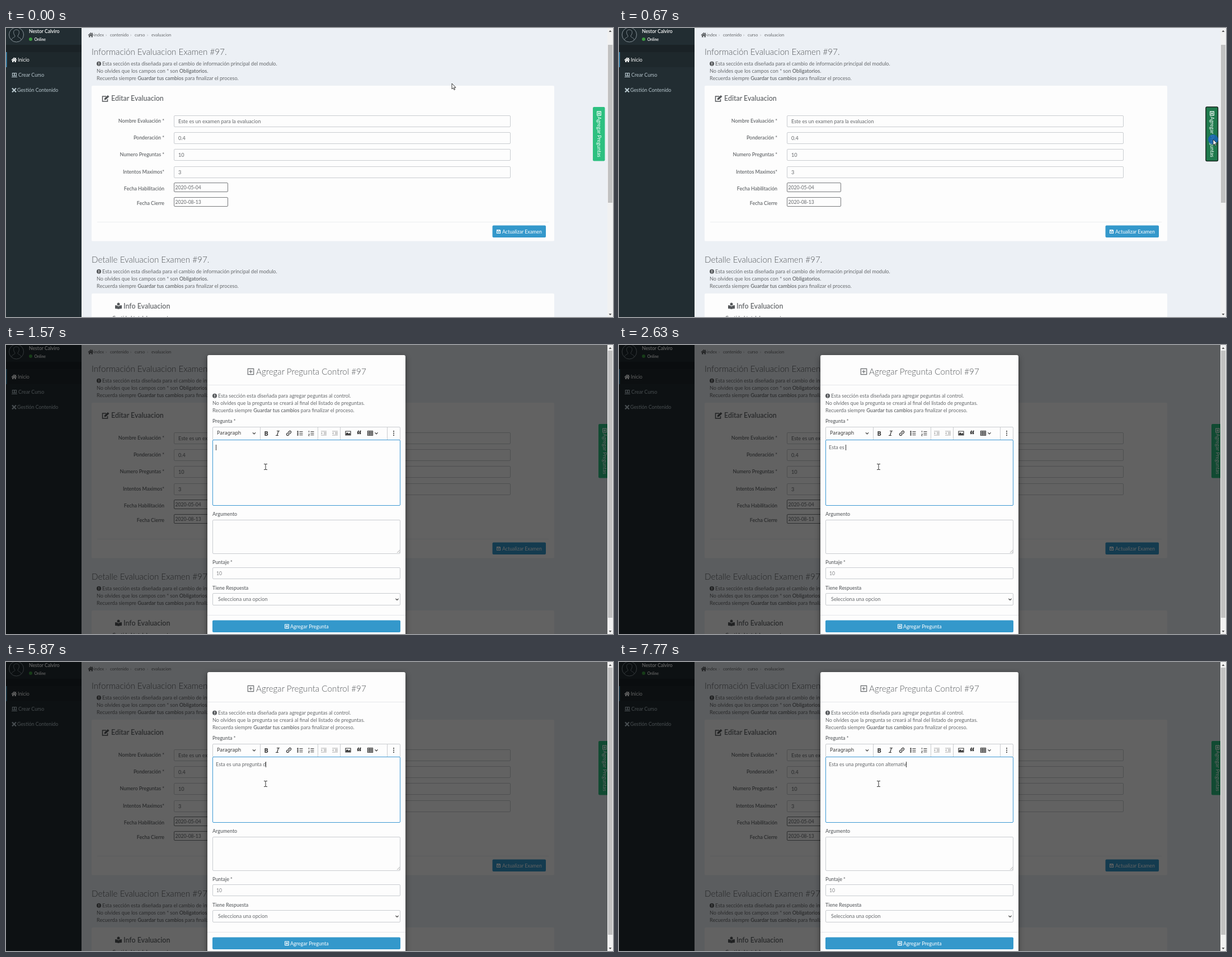
These frames come from a looping animation (1085x516 px, 8 s). An HTML page:

```html
<!DOCTYPE html>
<html lang="es">
<head>
<meta charset="utf-8">
<style>
  html, body { margin: 0; width: 100%; height: 100%; overflow: hidden; background: #ecf0f5; }
  svg { display: block; }
  text { font: 9.1px Lato, "Open Sans", sans-serif; fill: #66696c; white-space: pre; }
  .title { font-size: 15.2px; font-weight: 300; fill: #55585b; }
  .sub { font-size: 12.4px; font-weight: 600; }
  .label, .bold { font-weight: 600; }
  .label { font-size: 8.9px; }
  .crumb { font-size: 7.6px; }
  .menu { font-size: 8.9px; fill: #b8c7ce; }
  .white { fill: #fff; }
  .end { text-anchor: end; }
  .mid { text-anchor: middle; }
  .date { font-size: 8.6px; }
  .tool { font: 8.8px "Noto Sans", sans-serif; fill: #333; }
  .field { fill: #fdfdfd; stroke: #c9ccd0; }
  .line { fill: none; stroke: #333; stroke-width: 1.2; }
  .shadow { filter: drop-shadow(0 3px 5px rgba(0, 0, 0, .5)); }
</style>
</head>
<body>
<svg id="stage" width="1085" height="516" viewBox="0 0 1085 516"></svg>
<script>
const LOOP = 8000, PRESS = 630, OPEN = 700, FOCUS = 1470;

const text = (x, y, content, cls = '', extra = '') =>
  `<text x="${x}" y="${y}" class="${cls}" ${extra}>${content}</text>`;
const box = (x, y, w, h, fill, r = 0, extra = '') =>
  `<rect x="${x}" y="${y}" width="${w}" height="${h}" rx="${r}" fill="${fill}" ${extra}/>`;
const field = (x, y, w, h, extra = '') =>
  `<rect x="${x + .5}" y="${y + .5}" width="${w - 1}" height="${h - 1}" rx="1.5" class="field" ${extra}/>`;
const path = (d, extra = '') => `<path d="${d}" class="line" ${extra}/>`;
const shape = (d, fill, extra = '') => `<path d="${d}" fill="${fill}" ${extra}/>`;
const at = (x, y, content) => `<g transform="translate(${x} ${y})">${content}</g>`;

const home = (x, y, color) => at(x, y, shape('M-5 0L0-4.5 5 0 4 1 0-2.7-4 1ZM-3.4 1L0-2 3.4 1V4H1V1.5H-1V4H-3.4ZM2.3-4H3.5V-1L2.3-2Z', color));
const info = (x, y) => at(x, y, `<circle r="4" fill="#55585b"/>` + path('M0-2.5V.6M0 1.4V2.6', 'style="stroke:#fff"'));
const plus = (x, y, r, color) => at(x, y, path(`M${-r} ${-r}H${r}V${r}H${-r}ZM${-r * .6} 0H${r * .6}M0 ${-r * .6}V${r * .6}`, `style="stroke:${color}"`));
const save = (x, y) => at(x, y, path('M-3-3H2L3-2V3H-3ZM-1.5-3V-1H1.5V-3', 'style="stroke:#fff"') + '<circle cy="1" r="1" fill="#fff"/>');
const chevron = (x, y) => path(`M${x - 2.5} ${y - 1.2}l2.5 2.5 2.5-2.5`);

function notice(x, y, first, second) {
  return info(x + 4, y - 3.2) + text(x + 10, y, first) + text(x, y + 13, second) +
    text(x, y + 26, 'Recuerda siempre <tspan class="bold">Guardar tus cambios</tspan> para finalizar el proceso.');
}

function section(dy, name) {
  return at(0, dy, text(153, 48, `${name} Evaluacion Examen #97.`, 'title') +
    notice(162, 67, 'Esta sección esta diseñada para el cambio de información principal del modulo.',
      'No olvides que los campos con * son <tspan class="bold">Obligatorios</tspan>.') +
    box(153, 103, 827, 277.5, '#fdfdfd', 2));
}

function sidebar() {
  return box(0, 0, 135, 516, '#222d32') + box(0, 30, 135, 13, '#1a2226') +
    box(0, 43, 135, 27, '#1e282c') + box(0, 43, 1.5, 27, '#3c8dbc') +
    '<circle cx="18.5" cy="12" r="13" fill="#1c262b" stroke="#87939a"/>' +
    path('M10 21C11 16 16 18 16 14C12 9 13 3 18.5 3S25 9 21 14C21 18 26 16 27 21', 'style="stroke:#87939a;stroke-width:.9"') +
    text(41, 9, 'Nestor Calviro', 'white bold', 'style="font-size:8.6px"') +
    '<circle cx="44" cy="20" r="3" fill="#3c9a3f"/>' +
    text(50.5, 22.6, 'Online', 'white bold', 'style="font-size:7px"') +
    home(14.5, 57, '#fff') + text(21, 60, 'Inicio', 'menu white') +
    at(15, 84, path('M-3.5-3.5H3.5V1.5H-3.5ZM-5 3.5H5', 'style="stroke:#b8c7ce"') +
      '<circle cy="-1.5" r="1.2" fill="#b8c7ce"/>' + shape('M-2 1.5Q0-1.5 2 1.5', '#b8c7ce')) +
    text(22, 87, 'Crear Curso', 'menu') +
    path('M11 107.5l7 7M18 107.5l-7 7', 'style="stroke:#b8c7ce;stroke-width:2.2"') +
    text(20, 114, 'Gestión Contenido', 'menu');
}

function page() {
  const rows = [['Nombre Evaluación *', 'Este es un examen para la evaluacion'],
    ['Ponderación *', '0.4'], ['Numero Preguntas *', '10'], ['Intentos Maximos*', '3']];
  const dates = [['Fecha Habilitación', '2020-05-04'], ['Fecha Cierre', '2020-08-13']];
  const crumbs = [[157, 'index'], [186, 'contenido'], [230, 'curso'], [260, 'evaluacion']];
  const rowY = i => Math.round(156 + i * 30.2);
  return box(0, 0, 1085, 516, '#ecf0f5') + sidebar() + home(151.5, 12.5, '#55585b') +
    crumbs.map(([x, s]) => text(x, 15, s, 'crumb')).join('') +
    [178, 222, 252].map(x => text(x, 15, '›', 'crumb', 'opacity=".6"')).join('') +
    section(0, 'Información') + section(371, 'Detalle') +
    at(178, 126, path('M1-4H-5.5V5H3.5V1', 'style="stroke:#55585b;stroke-width:1.5"') +
      shape('M-2.5 2.5L-2-0.5 4-6 6.5-3.5 .5 2Z', '#55585b')) +
    text(188, 130, 'Editar Evaluacion', 'sub') +
    rows.map(([name, value], i) => text(283, rowY(i) + 13.3, name, 'label end') +
      field(300, rowY(i), 602, 21) + text(308, rowY(i) + 13.5, value)).join('') +
    dates.map(([name, value], i) => text(283, 290 + i * 26, name, 'label end') +
      field(300, 276 + i * 26, 97, 17, 'style="stroke:#77797c"') +
      text(302.5, 288 + i * 26, value, 'date')).join('') +
    box(163, 346, 807, 1, '#eceef0') +
    box(869.5, 352.5, 95.5, 21.5, '#3498cb', 2) + save(880.5, 363.5) +
    text(887, 366.5, 'Actualizar Examen', 'white', 'style="font-size:8.8px"') +
    at(201, 496, '<circle cy="-3" r="2.5" fill="#55585b"/>' + shape('M-6-1Q-2-1 0 1Q2-1 6-1V5Q2 5 0 6Q-2 5-6 5Z', '#55585b')) +
    text(210, 501, 'Info Evaluacion', 'sub') +
    text(190, 521, 'Cantidad total de preguntas:', 'label');
}

const sideButton = `<g id="sideButton"><rect id="sideFill" x="1049" y="141" width="21.5" height="96.5" rx="2"/>` +
  plus(1060, 152.5, 3.3, '#fff') + text(0, 0, 'Agregar Preguntas', 'white', 'transform="translate(1057 158) rotate(90)" style="font-size:9px"') + '</g>';

const scrollbar = (id, y, h) => `<g id="${id}">` + box(1075, 0, 10, 516, '#f1f1f1') +
  box(1076, y, 8, h, '#c1c1c1') + shape('M1077.5 7l2.5-3 2.5 3ZM1077.5 510l2.5 3 2.5-3Z', '#505050') + '</g>';

function toolbar() {
  const rows = [-3, 0, 3];
  const list = x => at(x, 157.5, path(rows.map(y => `M-1 ${y}H5`).join('')));
  const indent = (x, dir) => at(x, 157.5, path('M-5-3.5H5M0-1.2H5M0 1.2H5M-5 3.5H5', 'style="stroke:#aaa"') +
    shape(`M${-3.5 - dir}-2L${-3.5 + dir * 1.5} 0 ${-3.5 - dir} 2Z`, '#aaa'));
  return field(369, 146, 336, 24) + text(377, 160.3, 'Paragraph', 'tool') + chevron(443.5, 157.5) +
    [454, 557, 597, 681].map(x => box(x, 147, 1, 22, '#c9ccd0')).join('') +
    text(465.3, 161.5, 'B', 'tool mid', 'style="font-size:11px;font-weight:800"') +
    path('M484 153.5H489M482 161.5H487M487 153.5L484.5 161.5') +
    at(505.5, 157.5, '<g transform="rotate(-45)">' + path('M-.5-2H-3A2 2 0 0 0-3 2H-.5M.5-2H3A2 2 0 0 1 3 2H.5M-2 0H2') + '</g>') +
    list(525.5) + rows.map(y => `<circle cx="521.5" cy="${157.5 + y}" r="1.2" fill="#333"/>`).join('') +
    list(545.5) + path('M541.5 153V156M540.5 159H542.5L540.5 162H542.5', 'style="stroke-width:.9"') +
    indent(568, 1) + indent(588, -1) +
    at(611.5, 157.5, path('M-4.5-3.5H4.5V3.5H-4.5Z') + shape('M-4 3V1L-1.5-1.5 1 1 2.5-.5 4 1V3Z', '#333')) +
    text(631.3, 169.2, '“', 'tool mid', 'style="font:900 20px Lato,sans-serif"') +
    at(651, 157.5, path('M-4.5-4H4.5V4H-4.5ZM-4.5-1.3H4.5M-4.5 1.4H4.5M-1.5-4V4M1.5-4V4')) + chevron(662, 157.5) +
    [-3.5, 0, 3.5].map(y => `<circle cx="693" cy="${157.5 + y}" r="1.1" fill="#333"/>`).join('');
}

function modal() {
  return box(0, 0, 1085, 516, '#000', 0, 'opacity=".61"') + scrollbar('modalBar', 10, 477) +
    box(360, 18, 354, 510, '#fdfdfd', 3, 'class="shadow"') + plus(437.5, 47.5, 5.2, '#66696c') +
    text(447, 53, 'Agregar Pregunta Control #97', 'title') + box(360, 71, 354, 1, '#e5e7ea') +
    notice(369, 94, 'Esta sección esta diseñada para agregar peguntas al control.',
      'No olvides que la pregunta se creará al final del listado de preguntas.') +
    text(369, 139, 'Pregunta *', 'label') + toolbar() +
    field(369, 169, 336, 118, 'id="editor"') +
    text(375, 186, '', '', 'id="typed" style="font-size:9px"') + box(0, 178, 1, 10, '#333', 0, 'id="caret"') +
    text(369, 305.3, 'Argumento', 'label') + field(369, 312, 336, 61) +
    path('M699 371l5-5M702 371l2-2', 'style="stroke:#888;stroke-width:.7"') +
    text(369, 390.5, 'Puntaje *', 'label') + field(369, 397, 336, 21) + text(376, 411, '10', 'date', 'opacity=".8"') +
    text(369, 437, 'Tiene Respuesta', 'label') + field(369, 443, 336, 22) +
    text(379, 457, 'Selecciona una opcion') + chevron(699, 454) +
    box(360, 482, 354, 1, '#e5e7ea') + box(369, 491.5, 336, 21.5, '#3498cb', 2) +
    plus(502, 502.3, 3.3, '#fff') + text(508, 505.5, 'Agregar Pregunta', 'white', 'style="font-size:9px"');
}

const $ = id => document.getElementById(id);
$('stage').innerHTML = page() + sideButton + scrollbar('pageBar', 30, 282) + `<g id="modal">${modal()}</g>` +
  '<circle id="click" r="9" fill="#1763b5" opacity=".85"/>' +
  '<g id="arrow">' + shape('M0 0V10L2.4 7.9 4 11.5 5.6 10.8 4 7.3H7Z', '#fff', 'stroke="#222" stroke-width=".9"') + '</g>' +
  '<g id="beam">' + path('M-3-5H-1Q0-5 0-4Q0-5 1-5H3M0-4V4M-3 5H-1Q0 5 0 4Q0 5 1 5H3', 'style="stroke-width:1"') + '</g>';

// Each key press: time and character; '<' deletes one.
const KEYS = [[1930, 'E'], [2030, 's'], [2130, 't'], [2230, 'a'], [2330, ' '], [2430, 'e'],
  [2570, 's'], [2630, ' '], [2830, 'u'], [3000, 'n'], [3130, 'a'],
  [3370, ' '], [3400, 'p'], [3470, 'r'], [3670, 'e'], [3730, 'g'], [3870, 'u'],
  [4230, 'n'], [4300, 't'], [4400, 'a'], [4470, ' '], [5870, 'd'], [6000, '<'],
  [6070, 'c'], [6170, 'o'], [6330, 'n'], [6470, ' '], [6600, 'a'], [6800, 'l'], [6870, 't'],
  [6970, 'e'], [7070, 'r'], [7170, 'n'], [7300, 'a'], [7430, 't'], [7670, 'i'], [7770, 'v']];

const PATH = [[30, 797, 99], [600, 1062, 199], [870, 1062, 199], [1400, 464, 217.5]];

function pointer(t) {
  let [, x, y] = PATH[0];
  for (let i = 1; i < PATH.length; i++) {
    const [t0, x0, y0] = PATH[i - 1], [t1, x1, y1] = PATH[i];
    if (t < t0) break;
    const p = Math.min(1, (t - t0) / (t1 - t0)), k = p * p * (3 - 2 * p);
    x = x0 + (x1 - x0) * k;
    y = y0 + (y1 - y0) * k;
  }
  return [x, y];
}

const show = (id, on) => { $(id).style.display = on ? '' : 'none'; };

function draw(t) {
  const open = t >= OPEN, focused = t >= FOCUS, pressed = t >= PRESS && !focused;
  const [x, y] = pointer(t);
  const hover = !open && x > 1049;

  show('modal', open);
  show('pageBar', !open);
  $('sideButton').setAttribute('transform', `translate(${open ? 10 : 0} 0)`);
  $('sideFill').style.fill = pressed ? '#1f7a4d' : hover ? '#27a56c' : '#2dc080';
  $('sideFill').style.stroke = pressed ? '#15251d' : 'none';
  $('sideFill').style.strokeWidth = 1.5;
  $('editor').style.stroke = focused ? '#3b97d3' : '#c9ccd0';

  const done = KEYS.filter(([time]) => time <= t);
  $('typed').textContent = done.reduce((s, [, key]) => key === '<' ? s.slice(0, -1) : s + key, '');
  const last = done.length ? done[done.length - 1][0] : FOCUS;
  show('caret', focused && (t - last) % 1000 < 500);
  if (open) $('caret').setAttribute('x', Math.round(375 + $('typed').getComputedTextLength()));

  const beam = open && x > 369 && x < 705 && y > 169 && y < 287;
  show('arrow', !beam);
  show('beam', beam);
  for (const id of ['arrow', 'beam', 'click']) $(id).setAttribute('transform', `translate(${x} ${y})`);
  show('click', t >= PRESS && t < 800 || t >= 1430 && t < 1550);
}

function tick(now) {
  draw(now % LOOP);
  requestAnimationFrame(tick);
}
draw(0);
requestAnimationFrame(tick);
</script>
</body>
</html>
```
